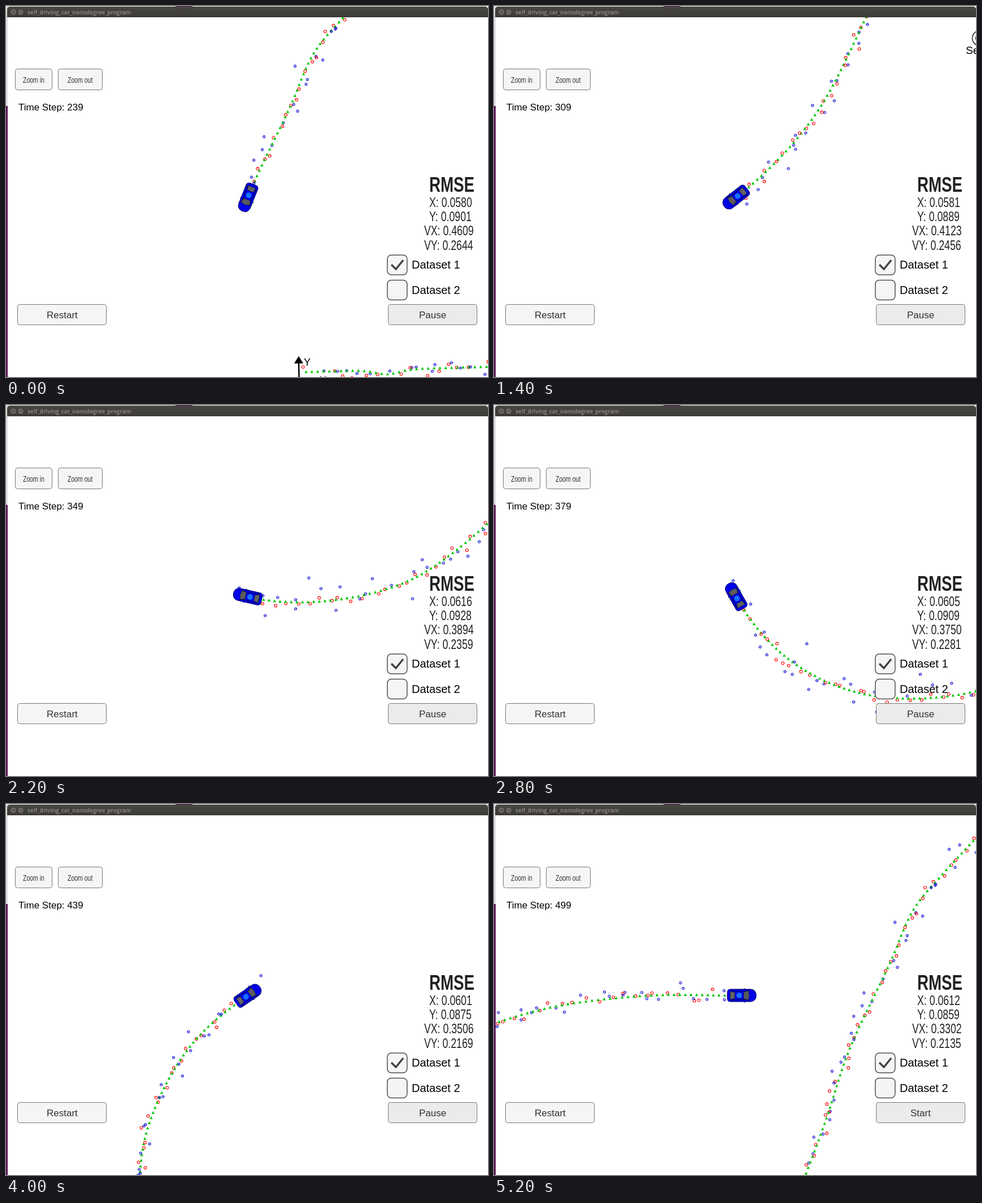
Animation of 853x657 px, one loop 5.9 s. Source, as an HTML page with a canvas:

```html
<!DOCTYPE html>
<html>
<head>
<meta charset="utf-8">
<style>
  html, body { margin: 0; width: 100%; height: 100%; overflow: hidden; background: #fff; }
  canvas { display: block; }
</style>
</head>
<body>
<canvas id="stage" width="853" height="657"></canvas>
<script>
const ctx = document.getElementById('stage').getContext('2d');
const SANS = '"Liberation Sans", Arial, sans-serif';
const FIRST = 239, LAST = 499, TICK = 100, LOOP = 5900;
const CENTER = [428, 339];
const LASER_ERROR = 5.5, RANGE_ERROR = 7, BEARING_ERROR = 0.025;

// Key points of the drive: step, x, y in pixels relative to the sensor
const route = [
  [188, 186, -772], [204, 77, -656], [211, 31, -602], [222, -16, -499], [239, -91, -338],
  [252, -132, -214], [274, -219, 0], [289, -292, 136], [309, -432, 282], [319, -511, 334],
  [334, -656, 372], [349, -802, 365], [365, -935, 299], [380, -1025, 186], [394, -1061, 58],
  [405, -1056, -51], [414, -1028, -133], [426, -968, -231], [441, -855, -325],
  [464, -638, -415], [481, -459, -440], [499, -279, -441]
];
// Readouts: step, then X, Y, VX, VY
const errors = [
  [239, .0580, .0901, .4609, .2644], [274, .0581, .0864, .4324, .2483],
  [309, .0581, .0889, .4123, .2456], [349, .0616, .0928, .3894, .2359],
  [414, .0586, .0874, .3603, .2203], [464, .0617, .0877, .3417, .2148],
  [499, .0612, .0859, .3302, .2135]
];

// Smooth interpolation of every column after the first
function sample(rows, s) {
  const last = rows.length - 1;
  const i = Math.max(0, rows.findIndex(row => row[0] >= s) - 1);
  const rate = (a, c) => (rows[a + 1][c] - rows[a][c]) / (rows[a + 1][0] - rows[a][0]);
  const slope = (k, c) => {
    if (k === 0) return rate(0, c);
    if (k === last) return rate(k - 1, c);
    const before = rows[k][0] - rows[k - 1][0], after = rows[k + 1][0] - rows[k][0];
    return (rate(k - 1, c) * after + rate(k, c) * before) / (before + after);
  };
  const h = rows[i + 1][0] - rows[i][0], u = (s - rows[i][0]) / h, v = 1 - u;
  return rows[i].slice(1).map((p, n) => {
    const c = n + 1;
    return v * v * (1 + 2 * u) * p + u * u * (3 - 2 * u) * rows[i + 1][c]
      + h * u * v * (v * slope(i, c) - u * slope(i + 1, c));
  });
}

const random = n => { const x = Math.sin(n * 127.1) * 43758.5; return x - Math.floor(x); };
// Roughly normal, with unit deviation
const noise = n => 1.73 * ([0, 0.21, 0.43, 0.67].reduce((sum, d) => sum + random(n + d), 0) - 2);

// Laser and radar take turns; radar errs in range and bearing
function makeMark(step, [x, y]) {
  const radar = step % 2 === 1, a = noise(step), b = noise(step + 0.1);
  if (!radar) return { step, x, y, radar, mx: x + a * LASER_ERROR, my: y + b * LASER_ERROR };
  const range = Math.hypot(x, y) + a * RANGE_ERROR;
  const bearing = Math.atan2(y, x) + b * BEARING_ERROR;
  return { step, x, y, radar, bearing, mx: range * Math.cos(bearing), my: range * Math.sin(bearing) };
}
const departure = s => [12 + 10.3 * s, -29 - 0.3 * s + 8 * Math.exp(-(((s - 14) / 3) ** 2))];
const marks = [];
for (let s = 0; s <= 33; s++) marks.push(makeMark(s, departure(s)));
for (let s = route[0][0]; s <= LAST; s++) marks.push(makeMark(s, sample(route, s)));

function text(str, x, y, size, { color = '#000', weight = '', narrow = 1, family = SANS } = {}) {
  ctx.save();
  ctx.translate(x, y);
  ctx.scale(narrow, 1);
  ctx.font = `${weight} ${size}px ${family}`;
  ctx.fillStyle = color;
  ctx.fillText(str, 0, 0);
  ctx.restore();
}

function shape(build, fill, stroke, width = 1) {
  ctx.beginPath();
  build();
  if (fill) { ctx.fillStyle = fill; ctx.fill(); }
  if (stroke) { ctx.strokeStyle = stroke; ctx.lineWidth = width; ctx.stroke(); }
}
const circle = (x, y, r, fill, stroke, width) => shape(() => ctx.arc(x, y, r, 0, 7), fill, stroke, width);
const box = (x, y, w, h, r, fill, stroke, width) => shape(() => ctx.roundRect(x, y, w, h, r), fill, stroke, width);
const polyline = points => points.forEach(([x, y]) => ctx.lineTo(x, y));
const polygon = (points, fill, stroke, width) =>
  shape(() => { polyline(points); ctx.closePath(); }, fill, stroke, width);
const line = (points, color, width) => shape(() => polyline(points), null, color, width);

function drawSensor() {
  circle(0, 0, 13.5, null, '#000', 1.3);
  circle(0, 0, 8, '#000');
  line([[0, 0], [-1, -46]], '#000', 2.5);
  line([[0, 0], [43, 0]], '#000', 2.5);
  polygon([[-1, -57], [-9, -44], [7, -44]], '#000');
  polygon([[52, 0], [41, -7], [41, 7]], '#000');
  text('Y', 8, -40, 18);
  text('X', 36, -8, 18);
  text('Sensor', -25, 28, 19);
}

function drawMark({ x, y, mx, my, radar, bearing }) {
  if (radar) {
    const dx = Math.cos(bearing) * 2, dy = Math.sin(bearing) * 2;
    circle(mx, my, 2.2, null, '#0000d0', 1);
    line([[mx - dx, my - dy], [mx + dx, my + dy]], '#0000d0', 0.8);
  } else {
    circle(mx, my, 2.4, null, '#f00', 1.1);
  }
  polygon([[x, y - 2.8], [x + 2.7, y + 2.2], [x - 2.7, y + 2.2]], '#00c800');
}

function drawCar(x, y, angle) {
  ctx.save();
  ctx.translate(x, y);
  ctx.rotate(angle);
  for (const side of [-1, 1]) polygon([[3, 10 * side], [5, 13 * side], [8, 10 * side]], '#000070');
  box(-25, -11, 51, 22, [5, 10, 10, 5], '#0000e8', '#000068', 1);
  for (const side of [-1, 1]) line([[-20, 8.5 * side], [4, 7 * side], [14, 9 * side]], '#000050', 1.2);
  polygon([[4, -6], [12, -8], [14, 0], [12, 8], [4, 6]], '#5a5a60', '#202040', 0.8);
  polygon([[-20, -7], [-12, -5.5], [-12, 5.5], [-20, 7]], '#626260', '#202040', 0.8);
  circle(-4, 0, 5, '#1470ff');
  ctx.restore();
}

function drawWindow() {
  ctx.fillStyle = '#e0dfde';
  ctx.fillRect(0, 0, 3, 177);
  ctx.fillStyle = '#5c1a58';
  ctx.fillRect(0, 177, 3, 480);
  ctx.fillRect(300, 0, 30, 2);
  const bar = ctx.createLinearGradient(0, 1, 0, 20);
  bar.addColorStop(0, '#484742');
  bar.addColorStop(1, '#3b3a36');
  box(2, 1, 851, 19, [5, 5, 0, 0], bar);
  for (const x of [13, 26]) circle(x, 11, 4.8, '#6d6a64');
  line([[11, 9], [15, 13]], '#3b3a36', 1);
  line([[15, 9], [11, 13]], '#3b3a36', 1);
  line([[23.5, 11], [28.5, 11]], '#3b3a36', 1);
  text('self_driving_car_nanodegree_program', 38, 15, 9.8,
    { color: '#85817a', weight: 'bold', family: '"Open Sans", sans-serif' });
}

function button(x, y, w, h, label, tx, ty, size, narrow, fill = '#f5f5f5') {
  box(x + 0.5, y + 0.5, w - 1, h - 1, 4, fill, '#777', 1);
  text(label, tx, ty, size, { color: '#323232', narrow });
}

function drawControls(step) {
  button(16, 111, 66, 38, 'Zoom in', 30, 136, 15, 0.7);
  button(92, 111, 79, 38, 'Zoom out', 109, 136, 15, 0.7);
  button(20, 528, 158, 37, 'Restart', 72, 553, 17, 1);
  const done = step === LAST;
  button(676, 528, 158, 37, done ? 'Start' : 'Pause', done ? 737 : 731, 553, 17, 1, '#ebebeb');
  text('Time Step: ' + step, 22, 185, 17);

  const ink = { color: '#222', narrow: 0.77 };
  text('RMSE', 749, 329, 36, { ...ink, weight: 'bold' });
  const values = sample(errors, step);
  ['X', 'Y', 'VX', 'VY'].forEach((name, i) =>
    text(`${name}: ${values[i].toFixed(4)}`, i < 2 ? 749 : 740, 356 + 25.2 * i, 23, ink));

  for (const i of [0, 1]) {
    const y = 441 + 44.5 * i;
    box(674.8, y, 35, 35, 7, '#f5f5f5', '#505050', 1.5);
    text('Dataset ' + (i + 1), 718, y + 24, 20);
  }
  line([[682, 458], [690, 466], [703, 450]], '#404040', 3.4);
}

function draw(now) {
  const step = Math.min(LAST, FIRST + 5 * Math.floor(now % LOOP / TICK));
  const camera = sample(route, Math.min(step, LAST - 1));
  const car = sample(route, step), behind = sample(route, step - 1);

  ctx.fillStyle = '#fff';
  ctx.fillRect(0, 0, 853, 657);
  ctx.save();
  ctx.beginPath();
  ctx.rect(3, 20, 850, 637);
  ctx.clip();
  ctx.translate(CENTER[0] - camera[0], CENTER[1] - camera[1]);
  drawSensor();
  for (const mark of marks) if (mark.step <= step) drawMark(mark);
  drawCar(car[0], car[1], Math.atan2(car[1] - behind[1], car[0] - behind[0]));
  ctx.restore();
  drawControls(step);
  drawWindow();
}

const begin = performance.now();
function loop() {
  draw(performance.now() - begin);
  requestAnimationFrame(loop);
}
loop();
</script>
</body>
</html>
```
